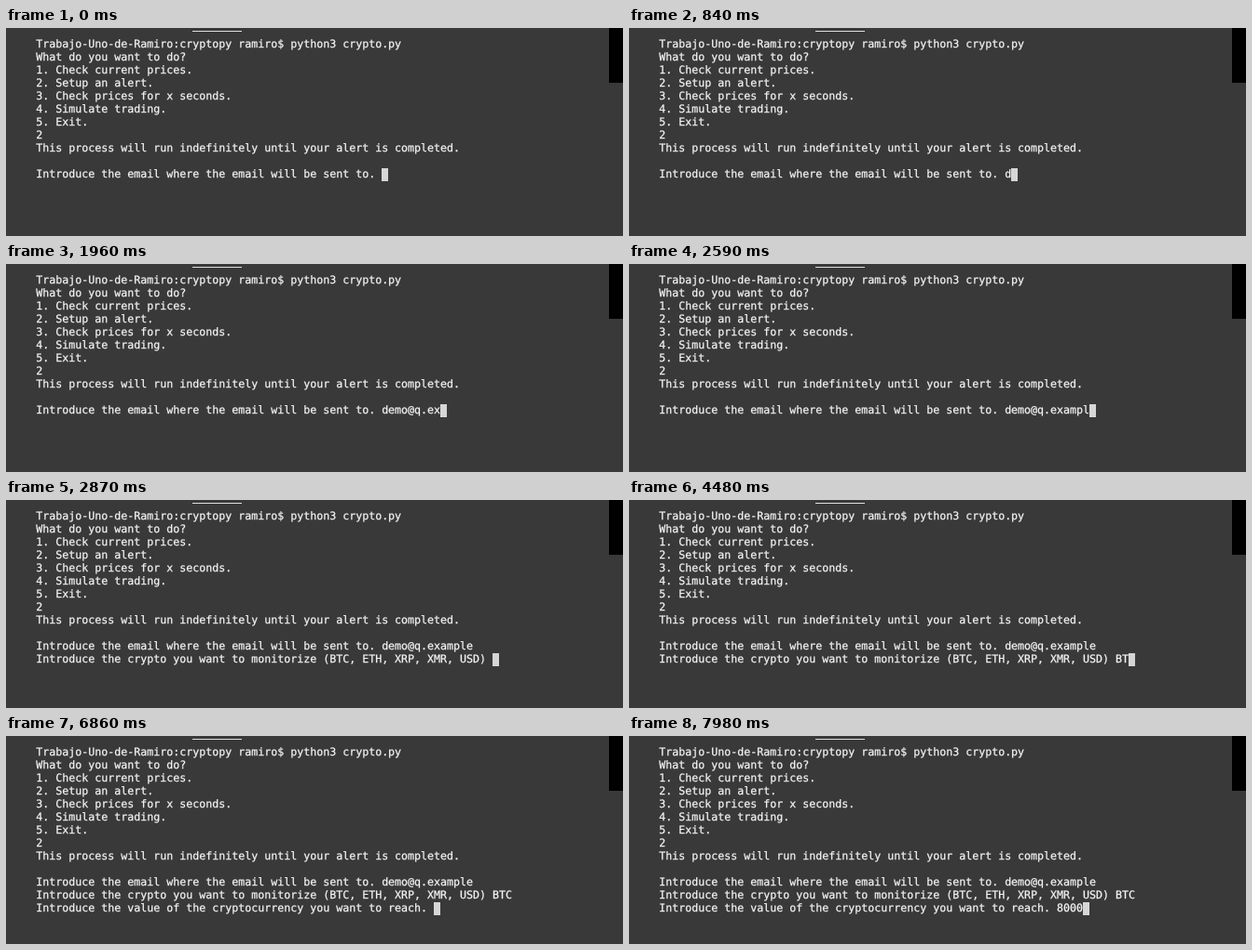
Recreate the animation shown at these times as an HTML page. Size 662 px wide and 224 px high, loop 8000 ms.

```html
<!DOCTYPE html>
<html lang="en">
<head>
<meta charset="utf-8">
<title>Price alert terminal</title>
<style>
  html, body { margin: 0; width: 100%; height: 100%; overflow: hidden; background: #393939; }
  .stage { position: relative; width: 662px; height: 224px; overflow: hidden; background: #393939; }
  .tab { position: absolute; left: 200px; top: 3px; width: 53px; height: 1px; background: #e0e0e0; }
  .edge { position: absolute; right: 0; top: 0; width: 15px; height: 59px; background: #000; }
  pre {
    position: absolute; left: 32.2px; top: 10px; margin: 0;
    font: 11.632px/14px "DejaVu Sans Mono", monospace;
    text-rendering: geometricPrecision;
    -webkit-text-stroke: 0.25px #f4f4f4;
    color: #f4f4f4;
  }
  .cursor {
    display: inline-block; position: relative; top: 1px;
    width: 7px; height: 14px; vertical-align: top; background: #d6d6d6;
  }
</style>
</head>
<body>
<div class="stage">
  <div class="tab"></div>
  <div class="edge"></div>
  <pre>Trabajo-Uno-de-Ramiro:cryptopy ramiro$ python3 crypto.py
What do you want to do?
1. Check current prices.
2. Setup an alert.
3. Check prices for x seconds.
4. Simulate trading.
5. Exit.
2
This process will run indefinitely until your alert is completed.

<span id="session"></span><span class="cursor"></span></pre>
</div>
<script>
  const LOOP = 8000;

  // Each prompt appears at `at`; one character of `input` lands at each key time.
  const prompts = [
    { at: 0, label: "Introduce the email where the email will be sent to. ",
      input: "demo@q.example",
      keys: [840, 910, 1050, 1190, 1470, 1610, 1750, 1890, 1960, 2100, 2310, 2380, 2590, 2660] },
    { at: 2800, label: "Introduce the crypto you want to monitorize (BTC, ETH, XRP, XMR, USD) ",
      input: "BTC", keys: [4060, 4480, 4760] },
    { at: 5110, label: "Introduce the value of the cryptocurrency you want to reach. ",
      input: "8000", keys: [7210, 7490, 7770, 7910] }
  ];

  const session = document.getElementById("session");
  const start = performance.now();
  let shown = null;

  function textAt(t) {
    return prompts
      .filter(p => t >= p.at)
      .map(p => p.label + p.input.slice(0, p.keys.filter(k => t >= k).length))
      .join("\n");
  }

  function draw() {
    const text = textAt((performance.now() - start) % LOOP);
    if (text !== shown) session.textContent = shown = text;
    requestAnimationFrame(draw);
  }
  draw();
</script>
</body>
</html>
```
